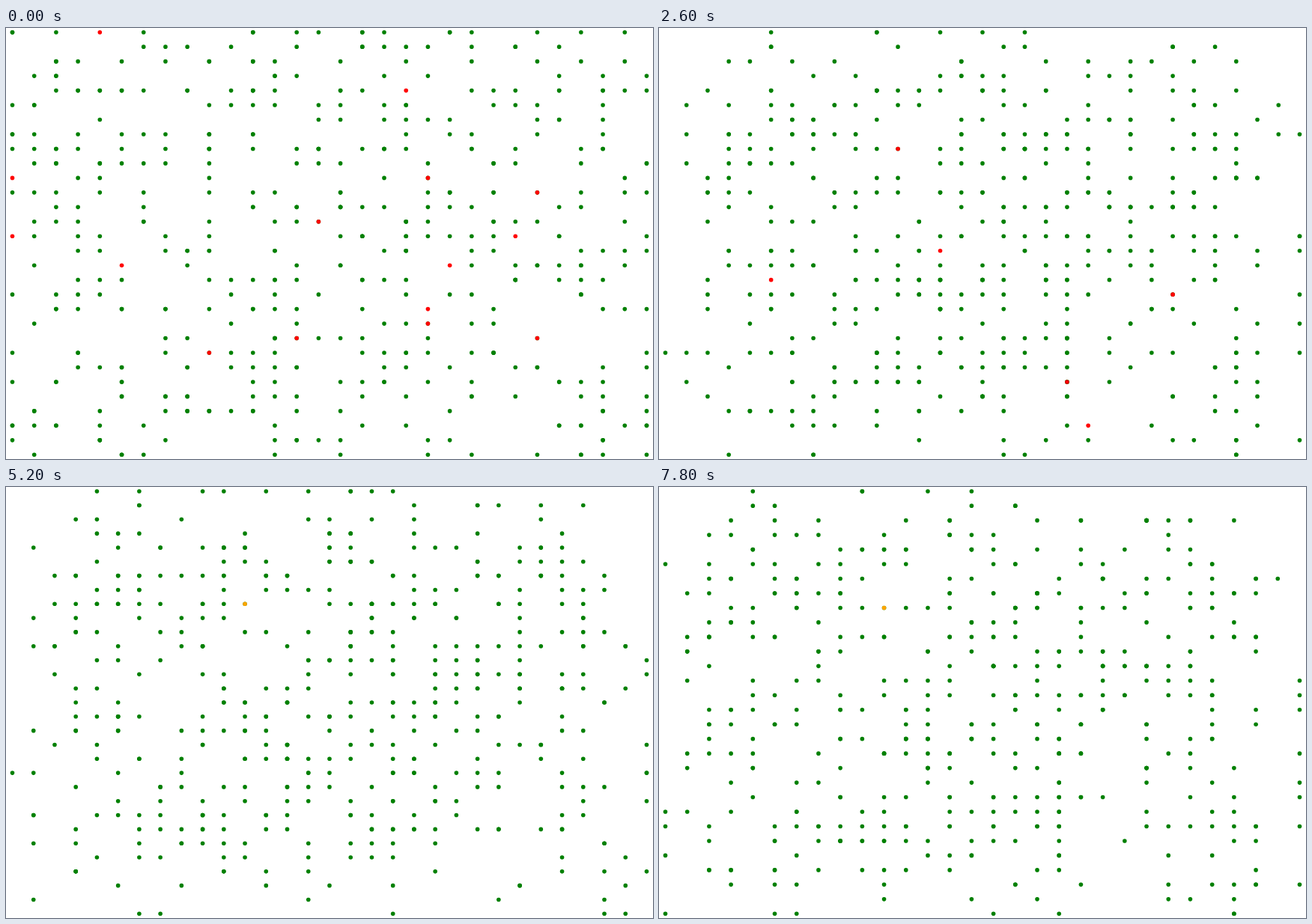
Write an HTML page with a canvas that moves like this. It is 864x576 px and loops after 8 s.

```html
<!DOCTYPE html>
<html lang="en">
<head>
<meta charset="utf-8">
<title>Grid population</title>
<style>
  html, body { margin: 0; width: 100%; height: 100%; overflow: hidden; background: #fff; }
  canvas { display: block; width: 864px; height: 576px; }
</style>
</head>
<body>
<canvas id="stage" width="864" height="576"></canvas>
<script>
const ctx = document.getElementById('stage').getContext('2d');
const STEP = 200, STEPS = 40, SETTLE = 6, RADIUS = 2.8;
const PEOPLE = 500, INFECTED = 15, ORANGE_FROM = 18;
const GREEN = '#008000', RED = '#ff0000', ORANGE = '#ffa500';

// Resting cells of the long-lasting infections; the first one never ends.
const lasting = [[10, 8], [4, 17], [23, 18], [12, 15], [18, 24], [19, 27]];

function randomFrom(seed) {
  return () => {
    seed = (seed + 0x6D2B79F5) | 0;
    let n = Math.imul(seed ^ (seed >>> 15), 1 | seed);
    n = (n + Math.imul(n ^ (n >>> 7), 61 | n)) ^ n;
    return ((n ^ (n >>> 14)) >>> 0) / 4294967296;
  };
}

const clamp = (v, max) => Math.max(0, Math.min(max, v));
const lerp = (a, b, k) => a + (b - a) * k;
const rand = randomFrom(2024);
const cell = () => Math.floor(rand() * 30);
const turn = (r = rand) => Math.floor(r() * 3) - 1;
const homeFrom = v => 14.5 + (v - 14.5) * 0.88 + (rand() + rand() - 1) * 3.5;

function infectionEnd(id) {
  if (id >= INFECTED) return 0;
  if (id === 0) return Infinity;
  return (id < lasting.length ? 14 : 8) + Math.floor(rand() * 5);
}

const people = Array.from({ length: PEOPLE }, (_, id) => {
  const x = cell(), y = cell();
  const [homeX, homeY] = lasting[id] || [homeFrom(x), homeFrom(y)];
  const still = id < INFECTED;
  return {
    id, x, y, homeX, homeY,
    swingX: still ? 0 : turn(),
    swingY: still ? 0 : turn(),
    calm: still ? 0 : 3 + 40 * rand() ** 2,
    end: infectionEnd(id)
  };
}).reverse(); // the infected are drawn last

function gridAt(step) {
  const even = step % 2 === 0;
  return {
    left: step === 0 || (!even && step > 21) ? 0 : -1,
    bottom: even && step > 0 ? 30 : 29
  };
}

function placePerson(p, step, bottom) {
  const k = Math.min(1, step / SETTLE);
  let x = lerp(p.x, p.homeX, k), y = lerp(p.y, p.homeY, k);
  if (step > 0 && step % 2 === 0) {
    x += p.swingX;
    y += p.swingY;
  }
  if (step > 0 && step < p.calm) {
    const r = randomFrom(p.id * 97 + step * 7919);
    x += turn(r);
    y += turn(r);
  }
  return [clamp(Math.round(x), 29), clamp(Math.round(y), bottom)];
}

function colorOf(p, step) {
  if (step >= p.end) return GREEN;
  return p.end === Infinity && step >= ORANGE_FROM ? ORANGE : RED;
}

function draw(step) {
  const { left, bottom } = gridAt(step);
  const dot = (col, row, color) => {
    ctx.fillStyle = color;
    ctx.beginPath();
    ctx.arc(
      8.5 + (Math.max(left, col) - left) * 847 / (29 - left),
      5.7 + row * 564.6 / bottom,
      RADIUS, 0, Math.PI * 2
    );
    ctx.fill();
  };

  ctx.fillStyle = '#fff';
  ctx.fillRect(0, 0, 864, 576);
  for (const p of people) dot(...placePerson(p, step, bottom), colorOf(p, step));

  // A single outsider stretches the grid to the left.
  if (step > 0) dot(-1, step % 2 ? 22 : 20, GREEN);
}

const started = performance.now();
let shown = -1;
function tick() {
  const step = Math.floor((performance.now() - started) / STEP) % STEPS;
  if (step !== shown) draw(shown = step);
  requestAnimationFrame(tick);
}
tick();
</script>
</body>
</html>
```
